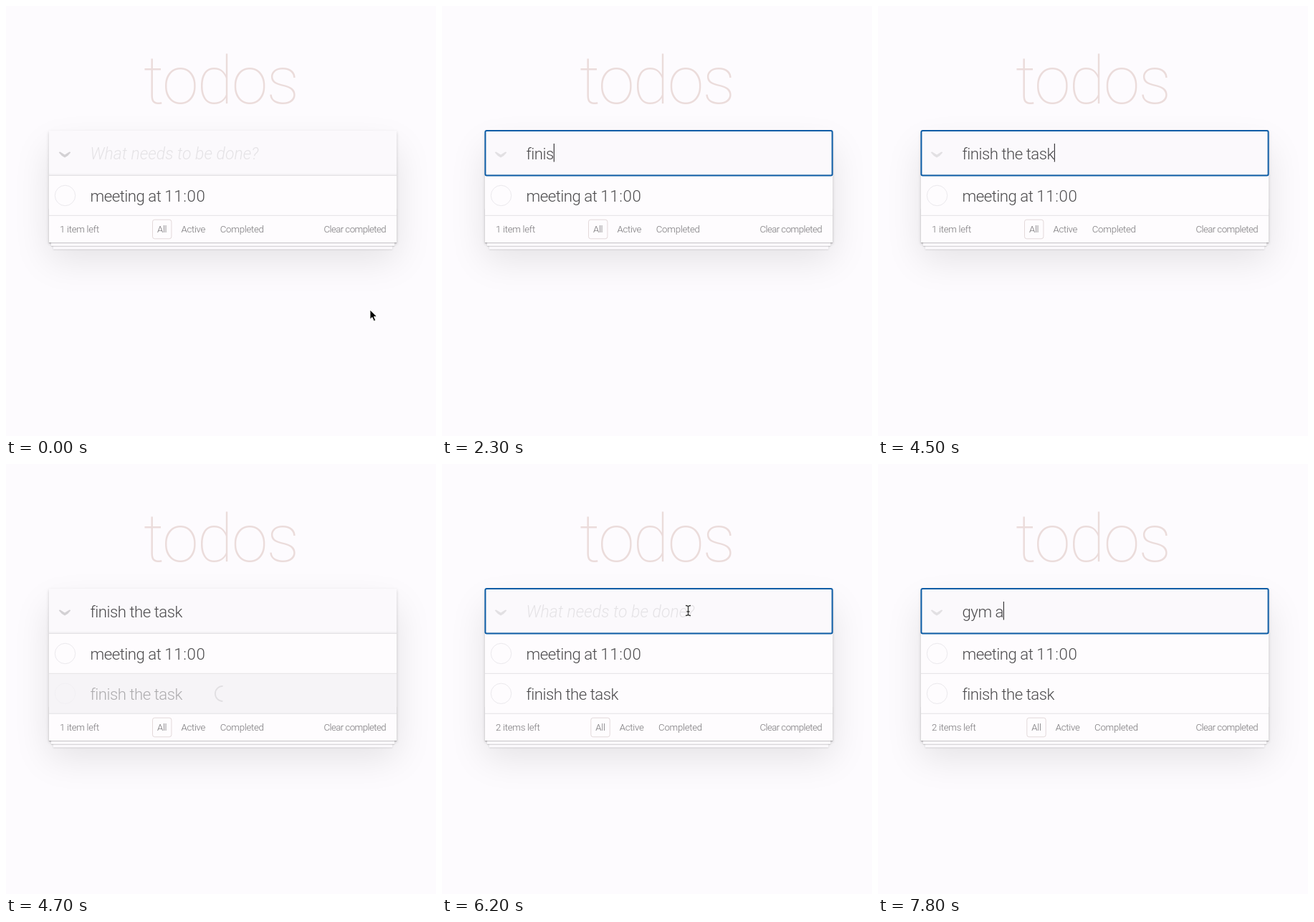
An HTML page for the animation above (8000 ms loop, 600 px wide and 600 px high).

```html
<!DOCTYPE html>
<html lang="en">
<head>
<meta charset="utf-8">
<title>todos</title>
<style>
  html, body { margin: 0; width: 100%; height: 100%; overflow: hidden; background: #fdfbfe; }
  #stage { position: relative; width: 600px; height: 600px; overflow: hidden; }
  #card {
    position: absolute; left: 60px; top: 174px; width: 485px; height: 156px; background: #fefcfe;
    box-shadow: 0 2px 4px rgba(0,0,0,.18), 0 24px 48px rgba(0,0,0,.1);
  }
  #card.tall { height: 212px; }
  #sheets {
    position: absolute; left: 0; right: 0; bottom: 0; height: 48px;
    box-shadow: 0 1px 1px rgba(0,0,0,.2), 0 7.6px 0 -2.8px #fcfafd, 0 8.5px 1px -2.8px rgba(0,0,0,.2),
      0 15.2px 0 -5.7px #fcfafd, 0 16.1px 2px -5.7px rgba(0,0,0,.2);
  }
  #field {
    position: absolute; left: 0; top: 0; right: 0; height: 62px; background: #fbf9fc;
    box-shadow: inset 0 -2px 1px rgba(0,0,0,.03);
  }
  svg { position: absolute; left: 0; top: 0; }
  text { font: 300 22.2px Roboto, "Liberation Sans", sans-serif; letter-spacing: -.022em; fill: #4b4a4c; white-space: pre; }
  .time { letter-spacing: .03em; }
  #heading { font-size: 92px; font-weight: 100; letter-spacing: -.022em; fill: #ebdcdb; text-anchor: middle; }
  #hint { font-size: 23px; font-style: italic; letter-spacing: 0; fill: #e5e3e6; }
  #footer text { font-size: 13.2px; letter-spacing: -.02em; fill: #777578; }
  #filters text { text-anchor: middle; }
  #footer #clear { text-anchor: end; letter-spacing: -.04em; }
  .line { stroke: #e3e1e4; }
  .ring { fill: none; stroke: #ebe9ed; }
</style>
</head>
<body>
<div id="stage">
  <div id="card"><div id="sheets"></div><div id="field"></div></div>
  <svg width="600" height="600" viewBox="0 0 600 600">
    <text id="heading" x="299.5" y="136">todos</text>
    <path id="chevron" d="M73.8 204.4Q74.6 203 76 203.8L82 207.4L88 203.8Q89.4 203 90.2 204.4Q87 209 82 211.4Q77 209 73.8 204.4Z"/>
    <text id="hint" x="117.5" y="213.5">What needs to be done?</text>
    <text id="typed" x="117.5" y="213.5"></text>
    <path id="caret" d="M0 192V217.5" stroke="#3c3b3d" stroke-width="1.2"/>
    <path class="line" d="M60 236.5H545"/>

    <circle class="ring" cx="82.5" cy="264.5" r="14.2"/>
    <text x="117.5" y="273">meeting at <tspan class="time">11:00</tspan></text>
    <path class="line" d="M60 292.3H545"/>

    <g id="added">
      <rect id="shade" x="60" y="293" width="485" height="55" fill="#f6f4f7"/>
      <g id="item">
        <circle class="ring" cx="82.5" cy="320.3" r="14.2"/>
        <text x="117.5" y="328.5">finish the task</text>
      </g>
      <path id="loader" d="M295 313A10.6 10.6 0 0 0 310 328" fill="none" stroke="#e1dfe2" stroke-width="1.8"/>
      <path class="line" d="M60 348.2H545"/>
    </g>

    <g id="footer">
      <text id="count" x="75" y="316"></text>
      <g id="filters">
        <rect x="204.5" y="298.2" width="26.4" height="26.6" rx="3" fill="none" stroke="#e3d9da"/>
        <text x="217.6" y="316">All</text>
        <text x="261.3" y="316">Active</text>
        <text x="329.2" y="316">Completed</text>
      </g>
      <text id="clear" x="530" y="316">Clear completed</text>
    </g>

    <rect id="focus" x="60.4" y="174" width="484.2" height="62.4" rx="2" fill="none" stroke="#0d5da6" stroke-width="2"/>
    <g id="mouse">
      <path id="arrow" d="M0 0V13.2L3 10.4L5.3 15.6L7.7 14.6L5.5 9.5H9.6Z" fill="#000" stroke="#fff" stroke-width=".9"/>
      <g id="beam" fill="none">
        <path d="M-3.5 -7Q0 -7 0 -5V5Q0 7 -3.5 7M3.5 -7Q0 -7 0 -5M0 5Q0 7 3.5 7M-2 1.5H2" stroke="#fff" stroke-width="3"/>
        <path d="M-3.5 -7Q0 -7 0 -5V5Q0 7 -3.5 7M3.5 -7Q0 -7 0 -5M0 5Q0 7 3.5 7M-2 1.5H2" stroke="#333" stroke-width="1.3"/>
      </g>
    </g>
  </svg>
</div>
<script>
const LOOP = 8000, ROW = 56;
const SUBMIT = 4700, SAVED = 5200;
const FOCUS = [600, 5700];
const phrases = [
  { text: 'finish the task', end: SAVED,
    keys: [1500, 1700, 2000, 2300, 2300, 2500, 2900, 3300, 3400, 3500, 3600, 3800, 4000, 4300, 4400] },
  { text: 'gym a', end: LOOP, keys: [6900, 7000, 7500, 7600, 7800] }
];
const moves = [
  { from: [508, 424], to: [414, 203.5], start: 100, stop: 600, show: 0, hide: 1500 },
  { from: [414, 203.5], to: [343.5, 204.5], start: 5200, stop: 5500, show: 5200, hide: 6900 }
];

const $ = id => document.getElementById(id);
const show = (id, on) => { $(id).style.display = on ? '' : 'none'; };
const ease = p => p * p * (3 - 2 * p);
const clamp = p => Math.min(1, Math.max(0, p));

function drawField(t) {
  const focused = (t >= FOCUS[0] && t < SUBMIT) || t >= FOCUS[1];
  const phrase = phrases.find(p => t < p.end);
  const pressed = phrase.keys.filter(k => k <= t);
  const typed = phrase.text.slice(0, pressed.length);
  const blinkStart = pressed.at(-1) ?? FOCUS[phrases.indexOf(phrase)];
  $('typed').textContent = typed;
  const x = 118 + (typed ? $('typed').getComputedTextLength() : 0);
  $('caret').setAttribute('transform', `translate(${x})`);
  show('caret', focused && (t - blinkStart) % 1000 < 500);
  show('hint', !typed);
  show('focus', focused);
  $('chevron').setAttribute('fill', focused ? '#e2e0e3' : '#d3d1d4');
}

function drawList(t) {
  const added = t >= SUBMIT, saved = t >= SAVED, pending = added && !saved;
  $('card').classList.toggle('tall', added);
  show('added', added);
  show('shade', pending);
  show('loader', pending);
  $('item').setAttribute('opacity', pending ? .42 : 1);
  $('loader').setAttribute('transform', `rotate(${45 + (t - SUBMIT) * .72} 302.5 320.5)`);
  $('footer').setAttribute('transform', `translate(0 ${added ? ROW : 0})`);
  $('filters').setAttribute('transform', `translate(${saved ? 3.3 : 0})`);
  $('count').textContent = saved ? '2 items left' : '1 item left';
}

function drawMouse(t) {
  const move = moves.find(m => t >= m.show && t < m.hide);
  show('mouse', move);
  if (!move) return;
  const p = ease(clamp((t - move.start) / (move.stop - move.start)));
  const [x, y] = move.from.map((a, i) => a + (move.to[i] - a) * p);
  const inField = y > 174 && y < 237;
  show('beam', inField);
  show('arrow', !inField);
  $('mouse').setAttribute('transform', `translate(${x} ${y})`);
}

const begin = performance.now();
function frame() {
  const t = (performance.now() - begin) % LOOP;
  drawField(t);
  drawList(t);
  drawMouse(t);
  requestAnimationFrame(frame);
}
frame();
</script>
</body>
</html>
```
